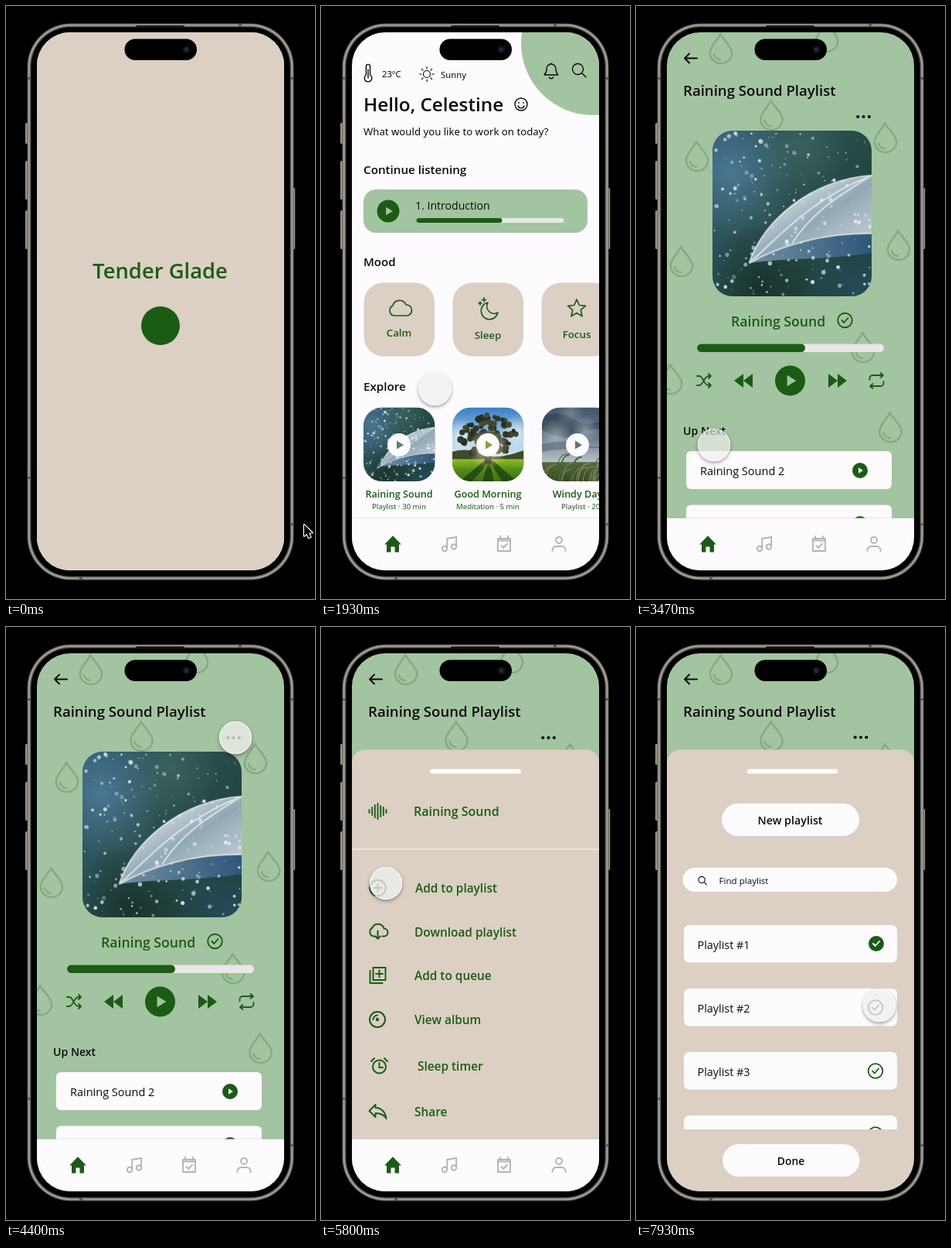
An HTML page with a canvas that plays this animation: 400 by 766 pixels, repeating every 8000 ms.

```html
<!DOCTYPE html>
<html lang="en">
<head>
<meta charset="utf-8">
<title>Meditation app walkthrough</title>
<style>
html, body { margin: 0; width: 100%; height: 100%; overflow: hidden; background: #000; }
canvas { display: block; width: 400px; height: 766px; }
</style>
</head>
<body>
<canvas id="stage"></canvas>
<script>
const W = 400, H = 766, LOOP = 8000;
const DARK = '#1b5c15', SAGE = '#a3c4a0', SAND = '#dbd0c3', WHITE = '#fdfbfe', INK = '#0b0b0b', GREY = '#b5b4b5';
const canvas = document.getElementById('stage');
const g = canvas.getContext('2d');
const dpr = window.devicePixelRatio || 1;
canvas.width = W * dpr;
canvas.height = H * dpr;

const clamp = v => Math.max(0, Math.min(1, v));
const easeOut = t => 1 - (1 - t) ** 2;
const smooth = t => t * t * (3 - 2 * t);
const noise = n => { const v = Math.sin(n * 127.1 + 11.7) * 43758.5453; return v - Math.floor(v); };

function box(x, y, w, h, r, color) {
  g.fillStyle = color;
  g.beginPath();
  g.roundRect(x, y, w, h, r);
  g.fill();
}
function dot(x, y, r, color) {
  g.fillStyle = color;
  g.beginPath();
  g.arc(x, y, r, 0, 7);
  g.fill();
}
function text(s, x, y, size, color = INK, weight = 600, align = 'left', family = 'Open Sans') {
  g.font = `${weight} ${size}px "${family}", "Noto Sans", sans-serif`;
  g.fillStyle = color;
  g.textAlign = align;
  g.fillText(s, x, y);
}
const note = (s, x, y, size, color = INK, align = 'left') => text(s, x, y, size, color, 400, align, 'Noto Sans');

// Icons are centred on 0,0.
const ring = (x, y, r) => `M${x - r},${y}a${r},${r} 0 1 0 ${2 * r},0a${r},${r} 0 1 0 ${-2 * r},0`;
const rays = Array.from({ length: 8 }, (_, i) => {
  const c = Math.cos(i * Math.PI / 4), s = Math.sin(i * Math.PI / 4);
  return `M${c * 7},${s * 7}L${c * 9.3},${s * 9.3}`;
}).join('');
const tick = 'M-4,0L-1.2,3L4,-3';
const icons = {
  thermo: 'M-2.6,2V-9a2.6,2.6 0 0 1 5.2,0V2a4.8,4.8 0 1 1 -5.2,0zM0,-5V6',
  sun: ring(0, 0, 4.5) + rays,
  bell: 'M-9,5Q-6,2 -6,-3A6,6 0 0 1 6,-3Q6,2 9,5ZM-2.6,8a2.8,2.8 0 0 0 5.2,0M0,-9V-10',
  search: ring(-1.5, -1.5, 7) + 'M3.6,3.6L9,9',
  smile: ring(0, 0, 8) + 'M-3,-2.5v1M3,-2.5v1M-4,2a4.2,4.2 0 0 0 8,0',
  cloud: 'M-8,9a7,7 0 0 1 -1,-13a9,9 0 0 1 17,-1a7,7 0 0 1 1,14z',
  moon: 'M-3,-10a11,11 0 1 0 13,13a9.5,9.5 0 0 1 -13,-13zM-13,-11v4M-15,-9h4M-8,-16v5M-10.5,-13.5h5',
  star: 'M0,-12L3.3,-4.5L11.4,-3.7L5.3,1.7L7.1,9.7L0,5.6L-7.1,9.7L-5.3,1.7L-11.4,-3.7L-3.3,-4.5Z',
  home: 'M-2.5,10.5V3.5H2.5V10.5H8V0.5H10.8L0,-10.8L-10.8,0.5H-8V10.5Z',
  music: ring(-6, 6, 3.2) + ring(6, 3.5, 3.2) + 'M-2.8,6V-7L9.2,-9V3.5',
  calendar: 'M-8,-7H8V9H-8ZM-8,-4.5H8M-5,-10v3M5,-10v3M-3.6,2.2L-0.8,5L4,-0.4',
  person: ring(0, -5, 4) + 'M-8.5,9v-1a5,5 0 0 1 5,-5h7a5,5 0 0 1 5,5v1',
  back: 'M8,0H-8M-2,-6L-8,0L-2,6',
  check: ring(0, 0, 9.3) + tick,
  tick,
  shuffle: 'M-9,-6h3c5,0 6,12 12,12h3M-9,6h3c5,0 6,-12 12,-12h3M6,-9l3,3l-3,3M6,3l3,3l-3,3',
  rewind: 'M0,-9V9L-12,0ZM12,-9V9L0,0Z',
  forward: 'M0,-9V9L12,0ZM-12,-9V9L0,0Z',
  repeat: 'M-9,-1v-2a4,4 0 0 1 4,-4h13M5,-10l3.5,3l-3.5,3M9,1v2a4,4 0 0 1 -4,4h-13M-5,10l-3.5,-3l3.5,-3',
  wave: 'M-11,-2v4M-7.3,-5v10M-3.7,-8v16M0,-10v20M3.7,-7v14M7.3,-5v10M11,-2v4',
  add: ring(0, 0, 10.3) + 'M0,-5v10M-5,0h10',
  download: 'M-4,6h-2a6,6 0 0 1 -1,-11a8,8 0 0 1 15,1a5,5 0 0 1 0,10h-2M0,-1v10M-3.3,6l3.3,3.3l3.3,-3.3',
  queue: 'M-6,-10H10V6H-6ZM-10,-6V10H6M2,-6.5v9M-2.5,-2h9',
  disc: ring(0, 0, 10) + ring(0, 0, 1.2) + 'M-5.5,0a5.5,5.5 0 0 1 5.5,-5.5',
  alarm: ring(0, 1, 8.5) + 'M0,-4v6h4.5M-10.5,-6l4,-4M10.5,-6l-4,-4',
  share: 'M-3,-9L-11,-1L-3,7V2C4,2 8,4 11,9C10,1 5,-5 -3,-5Z',
  drop: 'M-0.8,-19C3,-11 14.2,-3 14.2,5.5A14.2,13.5 0 0 1 -14.2,5.5C-14.2,-3 -4,-11 -0.8,-19ZM-9,7A9,8 0 0 0 -1,14',
  pointer: 'M0,0V14.5L3.4,11.4L5.8,17L8.4,15.9L6,10.4H10.5Z',
  play: 'M-0.2,-0.37L0.4,0L-0.2,0.37Z'
};
for (const k in icons) icons[k] = new Path2D(icons[k]);

function icon(name, x, y, color = INK, line = 1.4, scale = 1) {
  g.save();
  g.translate(x, y);
  g.scale(scale, scale);
  g.lineCap = g.lineJoin = 'round';
  if (line) {
    g.strokeStyle = color;
    g.lineWidth = line / scale;
    g.stroke(icons[name]);
  } else {
    g.fillStyle = color;
    g.fill(icons[name]);
  }
  g.restore();
}
function playButton(x, y, r, disc, mark) {
  dot(x, y, r, disc);
  icon('play', x, y, mark, 0, r);
}

// Pictures are drawn in a unit square.
function picture(paint, x, y, w, h, r) {
  g.save();
  g.beginPath();
  g.roundRect(x, y, w, h, r);
  g.clip();
  g.translate(x, y);
  g.scale(w, h);
  paint(w);
  g.restore();
}
function wash(x0, y0, x1, y1, ...stops) {
  const grad = g.createLinearGradient(x0, y0, x1, y1);
  stops.forEach((c, i) => grad.addColorStop(i / (stops.length - 1), c));
  return grad;
}
function glow(x, y, r, rgb, alpha) {
  const grad = g.createRadialGradient(x, y, 0, x, y, r);
  grad.addColorStop(0, `rgba(${rgb},${alpha})`);
  grad.addColorStop(1, `rgba(${rgb},0)`);
  g.fillStyle = grad;
  g.fillRect(0, 0, 1, 1);
}
function shape(d, color) {
  g.fillStyle = color;
  g.fill(new Path2D(d));
}
function rain(w) {
  g.fillStyle = wash(0, 0, 1, .6, '#2f5a70', '#2b5150', '#21413a');
  g.fillRect(0, 0, 1, 1);
  glow(.12, .25, .4, '84,128,160', .75);
  glow(.55, .1, .3, '70,112,104', .5);
  glow(.3, .95, .4, '20,44,38', .8);
  glow(.9, .95, .35, '38,80,112', .6);
  shape('M.23,.8C.38,.72 .6,.64 1,.62V.74C.7,.78 .45,.77 .23,.8Z', wash(.3, .7, 1, .7, '#6b8ba0', '#2f567a'));
  shape('M.23,.8C.32,.55 .6,.3 1,.27V.62C.7,.62 .43,.69 .23,.8Z', wash(.5, .35, .75, .75, '#d5dfe3', '#91a8b6', '#b9c7cf'));
  g.strokeStyle = 'rgba(240,246,248,.65)';
  g.lineWidth = .01;
  g.stroke(new Path2D('M.23,.8C.32,.55 .6,.3 1,.27M.23,.8C.4,.66 .6,.42 1,.27M.23,.8C.43,.69 .7,.62 1,.62M.5,.68C.62,.5 .78,.4 1,.27'));
  for (let i = 0; i < 190; i++) {
    const r = (.5 + noise(i + 900) ** 2 * 1.4) / Math.sqrt(w * 90);
    dot(noise(i), noise(i + 300), r, `rgba(228,241,246,${.25 + noise(i + 600) * .65})`);
  }
}
function morning() {
  g.fillStyle = wash(0, 0, 0, .7, '#3a80c6', '#84b8e2', '#dfe9ea');
  g.fillRect(0, 0, 1, 1);
  glow(.12, .4, .25, '245,248,248', .8);
  glow(.9, .35, .25, '245,248,248', .8);
  shape('M0,.6Q.2,.54 .4,.63T1,.58V.8H0Z', '#3f4a2a');
  g.fillStyle = wash(0, .7, 0, 1, '#93bd25', '#4f8a1a', '#3c701a');
  g.fillRect(0, .7, 1, .3);
  shape('M.45,.72L.1,1H.28L.5,.75ZM.5,.74L.42,1H.58L.53,.74ZM.53,.75L.7,1H.9L.57,.72Z', 'rgba(22,52,12,.65)');
  for (let i = 0; i < 100; i++) {
    const a = noise(i) * 6.3, d = Math.sqrt(noise(i + 150)) * .4;
    dot(.5 + Math.cos(a) * d, .38 + Math.sin(a) * d * .7, .025 + noise(i + 300) * .025, ['#2a2c20', '#424a2c', '#35362a'][i % 3]);
  }
  shape('M.47,.45H.53L.55,.76H.45Z', '#2b2419');
  glow(.5, .55, .28, '255,250,205', .7);
}
function windy() {
  g.fillStyle = wash(0, 0, 0, .8, '#42566c', '#667787', '#c8d0d3');
  g.fillRect(0, 0, 1, 1);
  shape('M0,.12Q.25,.02 .45,.16T1,.1V.34Q.7,.24 .5,.36T0,.3Z', 'rgba(48,62,78,.6)');
  glow(.2, .4, .25, '205,214,220', .55);
  glow(.6, .3, .2, '190,202,212', .5);
  glow(.4, .08, .2, '150,166,180', .5);
  shape('M0,.5Q.3,.42 .55,.5T1,.46V.56Q.5,.53 0,.6Z', 'rgba(76,92,106,.5)');
  g.fillStyle = wash(0, .7, 0, 1, '#5e6e45', '#34481f');
  g.fillRect(0, .74, 1, .26);
  g.lineWidth = .012;
  for (let i = 0; i < 40; i++) {
    const x = noise(i) * 1.1 - .1, h = .12 + noise(i + 40) * .26;
    g.strokeStyle = i % 2 ? '#4c6030' : '#7b8752';
    g.beginPath();
    g.moveTo(x, 1);
    g.quadraticCurveTo(x + .02, 1 - h, x + .16, 1 - h);
    g.stroke();
  }
}

function nav() {
  g.save();
  g.shadowColor = 'rgba(0,0,0,.4)';
  g.shadowBlur = 3 * dpr;
  g.fillStyle = WHITE;
  g.fillRect(40, 661.5, 320, 70);
  g.restore();
  icon('home', 93, 695, DARK, 0);
  icon('music', 166, 695, GREY, 1.9);
  icon('calendar', 237, 695, GREY, 1.9);
  icon('person', 308, 695, GREY, 1.9);
}
function splash() {
  g.fillStyle = SAND;
  g.fillRect(40, 34, 320, 696);
  text('Tender Glade', 199.5, 352, 27.4, DARK, 600, 'center');
  dot(200, 413, 25, DARK);
}
function homePage() {
  g.fillStyle = WHITE;
  g.fillRect(40, 34, 320, 696);
  dot(352, 48, 93, SAGE);
  icon('thermo', 61, 87, INK, 1.4);
  note('23°C', 79, 92, 11.2);
  icon('sun', 137, 88, INK, 1.2);
  note('Sunny', 155, 93, 11.3);
  icon('bell', 298, 84);
  icon('search', 334, 83);
  text('Hello, Celestine', 55, 136, 24.3);
  icon('smile', 259, 127);
  note('What would you like to work on today?', 55, 167, 13.2);

  text('Continue listening', 55, 217, 15.2);
  box(55, 237, 290, 56, 16, SAGE);
  playButton(87, 265, 14.5, DARK, SAGE);
  text('1. Introduction', 122, 263, 14.1, INK, 400);
  box(123.5, 274, 191, 6, 3, '#e6e9e4');
  box(123.5, 274, 111, 6, 3, DARK);

  text('Mood', 55, 336, 15);
  [['cloud', 'Calm', 101, 102, 391, 427], ['moon', 'Sleep', 216, 219, 393, 430], ['star', 'Focus', 331, 331, 391, 429]]
    .forEach(([name, label, cx, ix, iy, ty]) => {
      box(cx - 45.5, 357.5, 91.5, 95, 25, SAND);
      icon(name, ix, iy, DARK, 1.7);
      text(label, cx, ty, 13.3, DARK, 600, 'center');
    });

  text('Explore', 55, 497, 15.2);
  [[rain, 'Raining Sound', 'Playlist · 30 min', 101, 101, '#5d7a80'],
   [morning, 'Good Morning', 'Meditation · 5 min', 216, 216, '#86a32c'],
   [windy, 'Windy Day', 'Playlist · 20 min', 332, 346, '#61707c']]
    .forEach(([paint, title, sub, cx, subX, tint]) => {
      picture(paint, cx - 46, 518.5, 92.5, 95.5, 24);
      playButton(cx, 567, 15, WHITE, tint);
      text(title, cx, 634.5, 12.6, DARK, 600, 'center');
      note(sub, subX, 650, 9.6, DARK, 'center');
    });
  nav();
}
function playlistTop(dotX, dotY) {
  g.fillStyle = SAGE;
  g.fillRect(40, 34, 320, 696);
  [[110, 55], [247, 40], [175.5, 141], [323, 170], [79, 194], [340, 309], [59, 330], [294, 441], [45, 482], [329.5, 544]]
    .forEach(([x, y]) => icon('drop', x, y, '#84aa7e', 2.4));
  icon('back', 71, 67.5, INK, 2);
  text('Raining Sound Playlist', 61, 116, 18.6);
  for (let i = -1; i < 2; i++) dot(dotX + i * 7.3, dotY, 2.1, INK);
}
function playerPage() {
  playlistTop(294.5, 143);
  picture(rain, 99, 161, 206, 214, 26);
  text('Raining Sound', 123, 413.5, 17.7, DARK);
  icon('check', 270.5, 406, DARK, 1.9);
  box(79, 436.5, 242, 10.5, 5.2, '#e9e7e8');
  box(79, 436.5, 140, 10.5, 5.2, DARK);
  icon('shuffle', 88, 484, DARK, 1.8);
  icon('rewind', 139, 484, DARK, 0);
  playButton(199.5, 484, 19.5, DARK, SAGE);
  icon('forward', 261, 484, DARK, 0);
  icon('repeat', 311.5, 484, DARK, 1.8);
  text('Up Next', 61, 554, 14.1);
  box(65, 575, 266, 49, 6, WHITE);
  text('Raining Sound 2', 83, 605.5, 14.5, INK, 400);
  playButton(290, 600, 10, DARK, WHITE);
  box(65, 644.5, 266, 49, 6, WHITE);
  playButton(290, 669, 10, DARK, WHITE);
  nav();
}
function sheet(handleX) {
  box(40, 158.5, 320, 590, 17, SAND);
  box(handleX, 183.5, 118, 6, 3, WHITE);
}
function menuPage() {
  playlistTop(294.5, 143);
  sheet(141);
  icon('wave', 73.5, 238, DARK, 1.9);
  text('Raining Sound', 120, 244, 16, DARK);
  g.fillStyle = '#f1ebe4';
  g.fillRect(40, 286.3, 320, 1.5);
  [['add', 'Add to playlist', 73.5, 122, 337], ['download', 'Download playlist', 73.5, 121, 393.5],
   ['queue', 'Add to queue', 73.5, 121, 450], ['disc', 'View album', 73, 121, 507],
   ['alarm', 'Sleep timer', 75.5, 125, 567], ['share', 'Share', 73.5, 121, 626]]
    .forEach(([name, label, iconX, x, y]) => {
      icon(name, iconX, y, DARK, 2);
      text(label, x, y + 6, 15.4, DARK);
    });
  nav();
}
function pickerPage(picked) {
  playlistTop(291, 142.5);
  sheet(143.5);
  box(111, 228, 178, 42, 21, WHITE);
  text('New playlist', 199.5, 255, 14.3, INK, 600, 'center');
  box(60.5, 311, 277.5, 31, 15.5, WHITE);
  icon('search', 86, 327.5, INK, 1.1, .6);
  text('Find playlist', 107.5, 331.5, 11.6, INK, 400);
  g.save();
  g.beginPath();
  g.rect(40, 380, 320, 269);
  g.clip();
  for (let i = 0; i < 4; i++) {
    const y = 385 + i * 82;
    box(62, y, 276, 48.5, 7, WHITE);
    text('Playlist #' + (i + 1), 79.5, y + 30.5, 14.4, INK, 400);
    if (i === 0 && picked) {
      dot(311, y + 24, 10, DARK);
      icon('tick', 311, y + 24, WHITE, 1.9);
    } else icon('check', 310, y + 24.5, DARK, 1.8);
  }
  g.restore();
  box(112, 668, 177.5, 42, 21, WHITE);
  text('Done', 200.5, 695, 13.8, INK, 600, 'center');
}

// Cursor stops: time, x, y
const path = [[0, 388, 678], [150, 388, 678], [850, 194, 409], [1500, 194, 409], [2350, 103, 577], [2850, 103, 577],
  [3400, 101, 567], [3520, 101, 567], [4020, 354, 250], [4450, 295, 139], [5200, 295, 139], [5900, 72, 342],
  [6650, 72, 342], [7150, 311, 412], [7500, 311, 412], [7880, 315, 489], [8000, 315, 489]];
function cursor(t) {
  const i = path.findIndex(p => p[0] > t);
  const [t0, x0, y0] = path[i - 1], [t1, x1, y1] = path[i];
  const k = smooth((t - t0) / (t1 - t0));
  const x = x0 + (x1 - x0) * k, y = y0 + (y1 - y0) * k;
  if (x > 362) {
    icon('pointer', x - 2, y - 8, WHITE, 2.4);
    icon('pointer', x - 2, y - 8, '#000', 0);
    return;
  }
  // The shadow stays outside the translucent disc.
  g.save();
  g.beginPath();
  g.rect(0, 0, W, H);
  g.arc(x, y, 21, 0, 7);
  g.clip('evenodd');
  g.shadowColor = 'rgba(0,0,0,.4)';
  g.shadowBlur = 5 * dpr;
  g.shadowOffsetY = 2 * dpr;
  dot(x, y, 21, '#fff');
  g.restore();
  dot(x, y, 21, t > 2600 && t < 3500 ? 'rgba(240,238,238,.66)' : 'rgba(240,239,238,.76)');
  g.strokeStyle = 'rgba(255,255,255,.65)';
  g.lineWidth = 1.2;
  g.beginPath();
  g.arc(x, y, 20.6, 0, 7);
  g.stroke();
}

function phone() {
  [[151, 27], [200, 50], [264, 50]].forEach(([y, h]) => box(25, y, 4, h, 1.5, '#97938a'));
  box(371, 235, 3.2, 79, 1.5, '#97938a');
  box(27.5, 22.5, 345, 719, 56, '#625f58');
  box(28.7, 23.7, 342.6, 716.6, 55, '#aba79c');
  box(30.6, 25.6, 338.8, 712.8, 53, '#67645d');
  g.fillStyle = '#5b5852';
  [[28, 92], [368, 92], [28, 608], [368, 668]].forEach(([x, y]) => g.fillRect(x, y, 4, 3));
  g.fillRect(95, 737, 4, 4);
  g.fillRect(301, 23, 4, 4);
  box(32.3, 27.3, 335.4, 709.4, 51, '#000');
  box(168, 25, 63, 3, 1.5, '#181715');
}
function island() {
  box(153.5, 42.5, 93.5, 27.5, 13.8, '#000');
  dot(233.5, 56.5, 5, '#11131a');
  dot(233.5, 56.5, 2.6, '#1f2336');
  dot(232.8, 55.5, .9, '#3c4464');
}

const slides = [[homePage, 0, 0], [playerPage, 2880, 560], [menuPage, 4576, 600], [pickerPage, 6148, 600]];
function slideIn(draw, t, start, length) {
  if (t < start) return;
  const x = length ? 320 * (1 - easeOut(clamp((t - start) / length))) : 0;
  g.save();
  g.beginPath();
  g.rect(40 + x, 34, 320, 696);
  g.clip();
  g.translate(x, 0);
  draw(t > 7330);
  g.restore();
}
function render(t) {
  g.setTransform(dpr, 0, 0, dpr, 0, 0);
  g.fillStyle = '#000';
  g.fillRect(0, 0, W, H);
  phone();
  g.save();
  g.beginPath();
  g.roundRect(40, 34, 320, 695, 43);
  g.clip();
  slides.forEach(([draw, start, length], i) => {
    const next = slides[i + 1];
    if (!next || t < next[1] + next[2]) slideIn(draw, t, start, length);
  });
  const fade = clamp((t - 1050) / 500);
  if (fade < 1) {
    g.globalAlpha = 1 - fade;
    splash();
    g.globalAlpha = 1;
  }
  g.restore();
  island();
  cursor(t);
}
function loop() {
  render(performance.now() % LOOP);
  requestAnimationFrame(loop);
}
loop();
</script>
</body>
</html>
```
